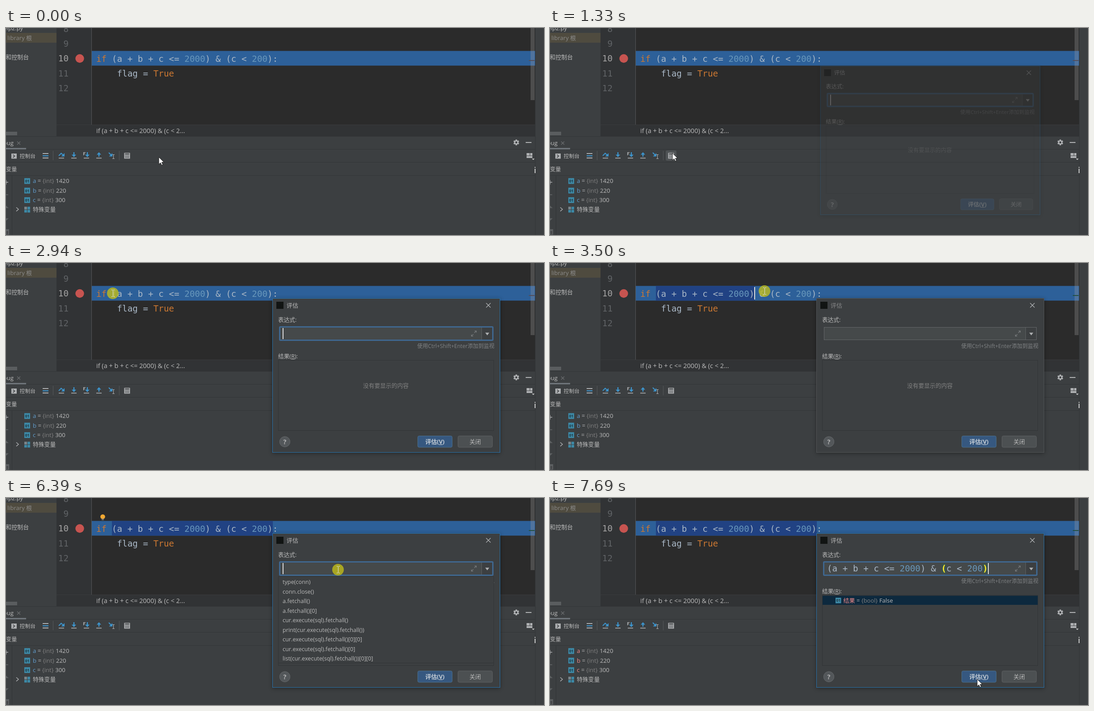
An HTML page for the animation above (8 s loop, 1204 px wide and 465 px high).

```html
<!DOCTYPE html>
<html lang="zh">
<head>
<meta charset="utf-8">
<title>Debugger: evaluate expression</title>
<style>
html, body { margin: 0; width: 100%; height: 100%; overflow: hidden; background: #3c3f41; }
svg { display: block; width: 1204px; height: 465px; }
text { white-space: pre; font-family: "Open Sans", "Noto Sans CJK SC", "Noto Sans CJK", sans-serif; }
text.code { font-family: "DejaVu Sans Mono", monospace; font-size: 19.3px; }
.shadow { filter: blur(5px); }
</style>
</head>
<body>
<svg id="stage" viewBox="0 0 1204 465"></svg>
<script>
const LOOP = 8000;
const PITCH = 11.62;
const ROW = { y: 51.5, h: 33 };
const C = {
  panel: '#3c3f41', editor: '#2b2b2b', gutter: '#313335', line: '#323537',
  text: '#bbbbbb', dim: '#808080', code: '#a9b7c6', key: '#cc7832', num: '#6897bb',
  icon: '#afb1b3', blue: '#3d94cc', name: '#629fd0', fresh: '#f08b8b', chip: '#3d89a6'
};

const esc = s => s.replace(/&/g, '&amp;').replace(/</g, '&lt;');
const rect = (x, y, w, h, fill, more = '') =>
  `<rect x="${x}" y="${y}" width="${w}" height="${h}" fill="${fill}" ${more}/>`;
const path = (d, stroke, width = 1, more = '') =>
  `<path d="${d}" fill="none" stroke="${stroke}" stroke-width="${width}" ${more}/>`;
const shape = (d, fill, more = '') => `<path d="${d}" fill="${fill}" ${more}/>`;
const circle = (x, y, r, fill, more = '') =>
  `<circle cx="${x}" cy="${y}" r="${r}" fill="${fill}" ${more}/>`;
const group = (id, body) => `<g id="${id}">${body}</g>`;
const spans = parts => parts.map(([s, fill, more = '']) =>
  `<tspan fill="${fill}" ${more}>${esc(s)}</tspan>`).join('');
const rich = (x, y, size, parts, more = '') =>
  `<text x="${x}" y="${y}" font-size="${size}" ${more}>${spans(parts)}</text>`;
const label = (x, y, size, s, fill = C.text, more = '') => rich(x, y, size, [[s, fill]], more);
const code = (x, y, parts, more = '') =>
  `<text class="code" x="${x}" y="${y}" ${more}>${spans(parts)}</text>`;

// The condition, shared by editor and input field; the last parentheses take their own style
const condition = pair => [
  ['(a + b + c <= ', C.code], ['2000', C.num], [') & ', C.code], ['(', ...pair],
  ['c < ', C.code], ['200', C.num], [')', ...pair]
];

const chip = (x, y, s = 13) => rect(x, y, s, s, C.chip) +
  label(x + s / 2, y + s - 3.2, 8.5, '01', '#1e3540', 'text-anchor="middle" font-weight="700"');

function editor() {
  const numbers = [8, 9, 10, 11, 12].map((n, i) =>
    code(140, 9 + i * 33.2, [[String(n), n === 10 ? '#a4a3a3' : '#606366']], 'text-anchor="end"')).join('');
  return rect(113, 0, 1071, 218, C.editor) + rect(113, 0, 79, 218, C.gutter) +
    path('M191.5 0V218', '#555759') + numbers +
    rect(192, ROW.y, 992, ROW.h, '#2d6099') +
    rect(237, ROW.y, 0, ROW.h, '#214283', 'id="selection"') +
    circle(165, 68.5, 9.7, '#c75450') +
    code(202, 76, [['if ', C.key], ...condition([C.code]), [':', C.code]]) +
    code(202 + 4 * PITCH, 109, [['flag = ', C.code], ['True', C.key]]) +
    rect(0, 54, 2, 28, '#e0e0e0', 'id="caret"') +
    rect(1174, 0, 9, 162, '#a6a6a6', 'opacity=".28"') +
    rect(1170, 72, 13, 2, '#544d58', 'id="mark"') +
    group('bulb', circle(216.5, 42, 5.3, '#f2a832') +
      rect(214, 46.5, 5, 1.2, '#8f8f8f') + rect(214, 48.5, 5, 1.2, '#8f8f8f')) +
    rect(113, 218, 1071, 25, C.gutter) + path('M113 217.5H1184', '#3a3c3e') +
    label(202, 235.8, 14.5, 'if (a + b + c <= 2000) & (c < 2...');
}

function project() {
  return rect(0, 11, 113, 22, '#4f4b3f') + label(38, 5, 13, 'elp2.py', C.text, 'text-anchor="end"') +
    label(3, 27, 13, 'library 根', '#8c8c8c') + label(-0.5, 70, 12.9, '和控制台') +
    rect(0, 233, 25, 8, '#5a5d5f');
}

function toolbar() {
  const teeth = [0, 60, 120].map(a =>
    rect(1140.3, 250.5, 3.4, 13, C.icon, `transform="rotate(${a} 1142 257)"`)).join('');
  const gear = teeth + circle(1142, 257, 4.8, C.icon) + circle(1142, 257, 2.2, C.panel);
  const arrow = (x, up) => up
    ? shape(`M${x} 279l5 5.5h-3.8v4.5h-2.4v-4.5h-3.8z`, C.blue)
    : shape(`M${x} 290l5-5.5h-3.8v-5.5h-2.4v5.5h-3.8z`, C.blue);
  const base = x => rect(x - 6, 291.5, 12, 1.6, C.icon);
  const keys = [0, 1, 2].flatMap(r => [0, 1, 2].map(c =>
    rect(266.8 + c * 3.2, 285.6 + r * 2.4, 1.9, 1.4, C.panel))).join('');
  return path('M0 243.5H1184M0 272.5H1184M0 301.5H1184M0 331.5H1184M13.5 332V465', C.line) +
    path('M1184.5 0V465', '#333638') +
    label(17, 263, 13.2, 'Debug', C.text, 'text-anchor="end"') +
    path('M25 255l7 7m0-7l-7 7', '#6e7173', 1.1) + rect(0, 269.5, 45, 3, '#747a80') +
    gear + rect(1163, 256.3, 13, 1.8, '#c3c5c7') +
    rect(12, 282, 12, 11.5, C.icon) + path('M15.5 284.5l4 3.2-4 3.2', C.panel, 1.6) +
    label(30.5, 292.3, 11.9, '控制台') +
    rect(82, 281, 13, 2, C.icon) + rect(82, 286, 13, 2.2, C.blue) + rect(82, 291, 13, 2, C.icon) +
    path('M105.5 276V297M253.5 276V297', '#55585a') +
    path('M118 287l5.5-5.5 5 4.5', C.blue, 2) + shape('M131 281v7.5h-7.5z', C.blue) + base(124) +
    arrow(152) + base(152) + arrow(182) + base(180) + rect(173, 279, 5, 1.4, C.icon) +
    rect(173, 282, 3.5, 1.4, C.icon) + rect(173, 279, 1.4, 7, C.icon) +
    arrow(208, true) + base(208) +
    path('M230 280l6 6', C.blue, 2.2) + shape('M238 281v7.5h-7.5z', C.blue) +
    path('M238 284.5h5m-5 9h5m-2.5-9v9', C.icon, 1.1) +
    rect(259, 275, 24, 23, '#4f5355', 'id="hover" rx="3"') +
    rect(264.5, 280.5, 13, 13, C.icon) + rect(266.3, 282, 9.4, 2, C.panel) + keys +
    rect(1165, 281, 7, 5.5, C.icon) + rect(1173, 281, 5, 5.5, C.icon) + rect(1165, 287.5, 13, 4.5, C.icon) +
    shape('M1177 293.5h6l-3 3z', '#d0d0d0') + rect(1183, 312, 2, 2, '#ccc') + rect(1183, 316, 2, 10, '#ccc');
}

function variables() {
  const rows = [['a', 1420], ['b', 220], ['c', 300]].map(([name, value], i) => {
    const y = 348.3 + i * 21.4;
    return chip(41, y - 11) + `<text x="60" y="${y}" font-size="13.2">` +
      `<tspan class="name" fill="${C.name}">${name}</tspan>` +
      spans([[' = ', C.text], ['{int} ', C.dim], [String(value), C.text]]) + '</text>';
  }).join('');
  return label(0, 322, 12.2, '变量') + rows +
    path('M23 403l5 4.3-5 4.3', C.icon, 1.4) +
    rect(41, 401.5, 6, 6, '#7c868b') + rect(48, 401.5, 6, 6, C.chip) +
    rect(41, 408.5, 6, 6, C.chip) + rect(48, 408.5, 6, 6, C.chip) +
    label(60, 412.3, 12.8, '特殊变量') +
    path('M-5 346.5H5M0 341.5V351.5', C.icon, 1.6) + path('M0 374.5H5', '#66696b', 1.4) +
    shape('M-6 404.5L0 399l6 5.5z', '#5d6062') + shape('M-6 427.5h12L0 433z', '#5d6062') +
    rect(0, 452, 7, 12, '#5d6062') + rect(1, 456, 4, 7, '#47494b');
}

function dialog() {
  const history = ['type(conn)', 'conn.close()', 'a.fetchall()', 'a.fetchall()[0]',
    'cur.execute(sql).fetchall()', 'print(cur.execute(sql).fetchall())',
    'cur.execute(sql).fetchall()[0][0]', 'cur.execute(sql).fetchall()[0]',
    'list(cur.execute(sql).fetchall())[0][0]']
    .map((s, i) => label(619, 193 + i * 21.5, 12.7, s)).join('');
  const pairBack = [22, 30].map(n => rect(620 + n * PITCH, 147, PITCH, 23, '#3b514d')).join('');
  const button = (x, fill, edge) => rect(x, 388.5, 77, 25.5, fill, `rx="3" stroke="${edge}"`);
  return rect(596, 81, 510, 347, '#000', 'class="shadow" opacity=".35"') +
    rect(596.5, 79.5, 509, 346, C.panel, 'id="frame"') +
    rect(605, 87, 16, 16, '#111413') +
    label(628, 99.8, 12.9, '评估', C.text, 'id="title"') +
    path('M1074.5 90l10 10m0-10l-10 10', '#b4b6b8', 1.2) +
    label(609, 132, 12.7, '表达式:') +
    rect(613.5, 144.5, 475, 28, '#45494a', 'stroke="#646769"') +
    rect(1065, 145, 23, 27, C.panel) + path('M1064.5 145V172', '#5e6163') +
    shape('M1072.5 156.5h9l-4.5 6z', C.icon) +
    path('M1048 157l4.5-4.5m-4 0h4v4M1046 160l-4.5 4.5m4 0h-4v-4', '#797c7e', 1.2) +
    rect(612.5, 143.5, 477, 30, 'none', 'id="ring" rx="1.5" stroke="#3f678f" stroke-width="3"') +
    group('pasted', pairBack + code(620, 165, condition(['#ffef28', 'font-weight="700"']))) +
    rect(619, 146, 2, 25, '#dcdcdc', 'id="fieldCaret"') +
    label(1093, 191, 12, '使用Ctrl+Shift+Enter添加到监视', '#808385', 'text-anchor="end"') +
    rich(609, 214, 12.7, [['结果(', C.text], ['R', C.text, 'text-decoration="underline"'], ['):', C.text]]) +
    rect(609.5, 218.5, 482, 158, C.panel, 'stroke="#313436"') +
    label(850, 280, 12.75, '没有要显示的内容', C.dim, 'id="empty" text-anchor="middle"') +
    group('result', rect(610, 219.5, 481.5, 20.5, '#0d293e') + chip(639, 224, 12.5) +
      rich(656.5, 235, 13, [['结果', C.fresh], [' = ', C.text], ['{bool} ', C.dim], ['False', C.text]])) +
    group('history', rect(609.5, 176.5, 482, 194, C.panel, 'stroke="#313436"') + history) +
    circle(624, 401.5, 11.7, '#53575a', 'stroke="#65686a"') +
    label(624, 407, 15, '?', '#c8c8c8', 'text-anchor="middle" font-weight="600"') +
    button(921.5, '#365880', '#4c708c') + button(1011.5, '#4c5052', '#5e6163') +
    rich(960, 406.3, 12.9, [['评估(', '#c8d0d8'], ['V', '#c8d0d8', 'text-decoration="underline"'], [')', '#c8d0d8']],
      'text-anchor="middle" font-weight="700"') +
    label(1050, 406.3, 12.8, '关闭', C.text, 'text-anchor="middle"');
}

function pointer() {
  const beam = 'M-3 -7.5h2.5l1 1 1-1h2.5M.5 -6.5V6.5M-3 7.5h2.5l1-1 1 1h2.5';
  const heads = 'M-6.5 -7.5h5.5l-5.5 5.5zM6.5 7.5h-5.5l5.5-5.5z';
  return group('pointer',
    circle(0, 0, 13, '#c3bf18', 'id="click" opacity=".78"') +
    group('arrow', shape('M0 0V16.2L3.8 12.7 6.4 18.2 9 17 6.5 11.7H11.6Z', '#fff',
      'stroke="#1c1c1c" stroke-width="1"')) +
    group('beam', path(beam, '#dfe3e6')) +
    group('resize', path('M-4 -5L4 5', '#111', 3.6) + shape(heads, '#fff', 'stroke="#111" stroke-width="1.6"') +
      path('M-4 -5L4 5', '#fff', 1.6) + shape(heads, '#fff')));
}

document.getElementById('stage').innerHTML =
  rect(0, 0, 1204, 465, C.panel) + project() + editor() + toolbar() + variables() +
  group('dialog', dialog()) + pointer();

const el = {};
document.querySelectorAll('[id]').forEach(node => { el[node.id] = node; });
const names = document.querySelectorAll('.name');
const show = (id, on) => { el[id].style.display = on ? '' : 'none'; };
const set = (id, attr, value) => el[id].setAttribute(attr, value);
const within = (t, a, b) => t >= a && t < b;
const smooth = u => u * u * (3 - 2 * u);

// Pointer stops: time, x, y
const track = [
  [460, 342, 290], [870, 274, 281], [1560, 274, 281], [1950, 662, 212], [2020, 662, 212],
  [2640, 239, 68], [3170, 239, 68], [3500, 479, 63], [3630, 608, 64], [3760, 608, 64],
  [4230, 599, 65], [4580, 599, 65], [4780, 593, 84], [5510, 593, 84], [5950, 743, 161],
  [6600, 743, 161], [7080, 956, 394], [7150, 956, 394], [7260, 956, 407], [LOOP, 956, 407]
];
const clicks = [[1150, 1300], [2860, 4260], [5980, 6120], [6330, 6480], [7280, 7420]];

// Whole pixels, as a system pointer moves
function pointerAt(t) {
  const i = track.findIndex(k => t < k[0]);
  if (i <= 0) return track[0].slice(1);
  const [a, x0, y0] = track[i - 1], [b, x1, y1] = track[i];
  const u = (t - a) / (b - a);
  const e = within(t, 3170, 3630) ? u : smooth(u);
  return [Math.round(x0 + (x1 - x0) * e), Math.round(y0 + (y1 - y0) * e)];
}

function draw(t) {
  const [x, y] = pointerAt(t);
  const opened = t >= 1270;
  const focused = t < 3040 || t >= 6000;
  const pasted = t >= 6750;
  const done = t >= 7420;

  const open = Math.min(1, Math.max(0, (t - 1270) / 200));
  const scale = 1 - 0.0714 * (1 - open) ** 2;
  show('dialog', opened);
  set('dialog', 'opacity', open);
  set('dialog', 'transform', `translate(850 252.5) scale(${scale}) translate(-850 -252.5)`);

  set('frame', 'stroke', focused ? '#2873ad' : '#525557');
  set('title', 'opacity', focused ? 1 : 0.6);
  show('ring', focused);
  show('fieldCaret', focused);
  set('fieldCaret', 'x', pasted ? 980 : 619);
  show('pasted', pasted);
  show('history', within(t, 6060, 6480));
  show('result', done);
  show('empty', !done);
  names.forEach(n => n.setAttribute('fill', done ? C.fresh : C.name));

  // The selection end trails the pointer by two cells until the drag settles
  const cols = t < 3170 ? 0 : t >= 3600 ? 31 : Math.max(0, Math.min(31, Math.round((x - 257) / PITCH)));
  const end = 237 + cols * PITCH;
  set('selection', 'width', end - 237);
  set('caret', 'x', Math.round(end - 1));
  show('caret', within(t, 3040, 5180));
  set('mark', 'fill', t < 3040 ? '#544d58' : '#24503f');
  show('bulb', within(t, 5050, 6560));

  show('hover', within(t, 780, 1640));
  set('hover', 'fill', within(t, 1150, 1300) ? '#5c6164' : '#4f5355');

  const inDialog = opened && x > 596 && y > 79;
  const inField = inDialog && within(x, 613, 1040) && within(y, 144, 173);
  const resizing = within(t, 4720, 5560);
  const beam = !resizing && (inField || (!inDialog && x > 192 && y < 218));
  show('resize', resizing);
  show('beam', beam);
  show('arrow', !resizing && !beam);
  show('click', clicks.some(([a, b]) => within(t, a, b)));
  set('pointer', 'transform', `translate(${x} ${y})`);
}

const start = performance.now();
function tick() {
  draw((performance.now() - start) % LOOP);
  requestAnimationFrame(tick);
}
tick();
</script>
</body>
</html>
```
